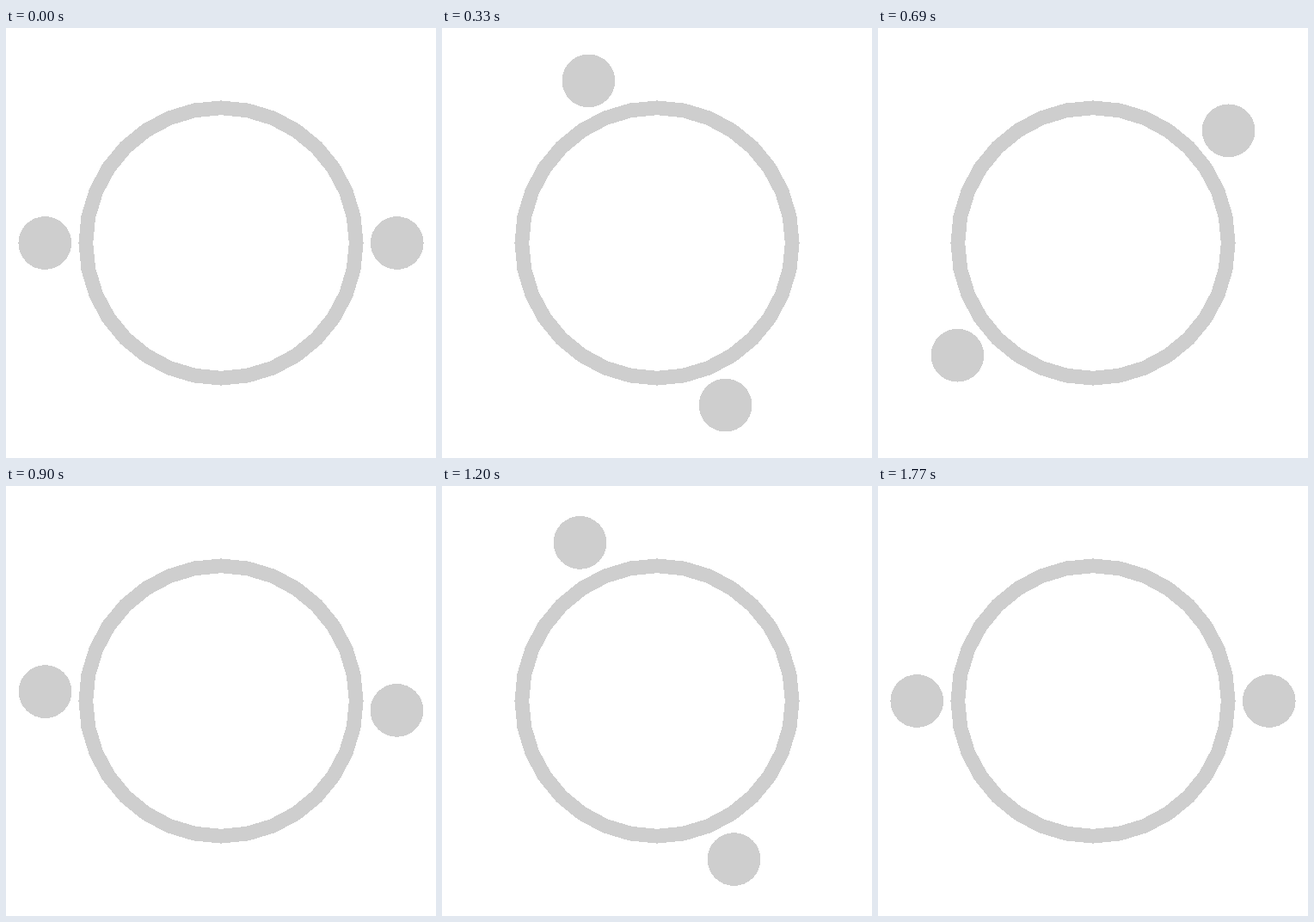
These frames come from a looping animation (500 px wide and 500 px high, 1800 ms). An HTML page:

```html
<!DOCTYPE html>
<html lang="en">
<head>
<meta charset="utf-8">
<title>Orbiting dots</title>
<style>
  html, body { margin: 0; height: 100%; overflow: hidden; background: #fff; }
  svg { display: block; width: 100vw; height: 100vh; fill: #cecece; shape-rendering: crispEdges; }
</style>
</head>
<body>
<svg viewBox="-250 -250 500 500">
  <path id="ring" fill-rule="evenodd"/>
  <circle class="dot" r="30.9"/>
  <circle class="dot" r="30.9"/>
</svg>
<script>
const SIDES = 32, OUTER = 165.6, INNER = 148.8, ORBIT = 204.7;
const STEP_MS = 30, STEPS = 60;

const polygon = r => 'M' + Array.from({ length: SIDES }, (_, i) => {
  const a = i * 2 * Math.PI / SIDES;
  return (r * Math.cos(a)).toFixed(3) + ',' + (r * Math.sin(a)).toFixed(3);
}).join('L') + 'Z';

document.getElementById('ring').setAttribute('d', polygon(OUTER) + polygon(INNER));
const dots = document.querySelectorAll('.dot');

function draw(time) {
  // The first and last steps share one pose, so a turn spans STEPS - 1 intervals.
  const step = Math.floor(time / STEP_MS) % STEPS;
  const turn = step / (STEPS - 1) * 2 * Math.PI;
  dots.forEach((dot, i) => {
    const a = turn + i * Math.PI;
    dot.setAttribute('cx', -ORBIT * Math.cos(a));
    dot.setAttribute('cy', -ORBIT * Math.sin(a));
  });
}

let start;
function tick(now) {
  start ??= now;
  draw(now - start);
  requestAnimationFrame(tick);
}
draw(0);
requestAnimationFrame(tick);
</script>
</body>
</html>
```
